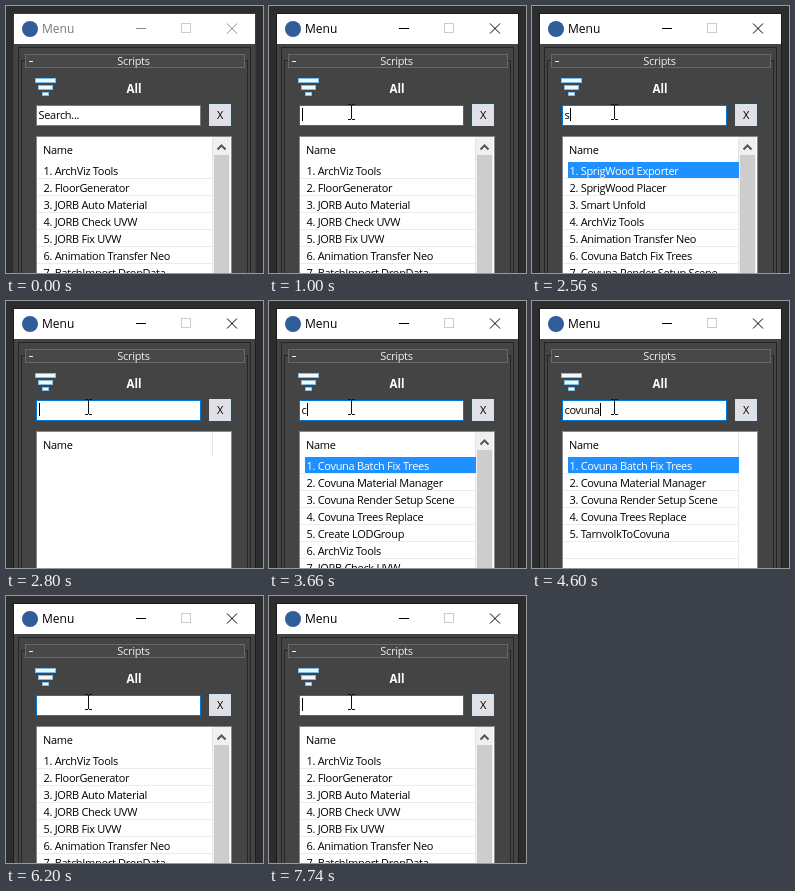
These frames come from a looping animation (257 px wide and 267 px high, 8000 ms). An HTML page:

```html
<!DOCTYPE html>
<html lang="en">
<head>
<meta charset="utf-8">
<title>Menu</title>
<style>
html, body { margin: 0; width: 100%; height: 100%; overflow: hidden; background: #2d2d2d; }
svg { display: block; shape-rendering: crispEdges; }
text { font: 11px "Open Sans", "Noto Sans", sans-serif; letter-spacing: -.3px; white-space: pre; }
</style>
</head>
<body>
<svg width="257" height="267" viewBox="0 0 257 267">
  <rect width="257" height="267" fill="#2d2d2d"/>
  <rect id="edge" x="7" y="7" width="243" height="270"/>
  <rect x="8" y="8" width="241" height="270" fill="#444"/>

  <!-- title bar -->
  <rect x="8" y="8" width="241" height="30" fill="#fff"/>
  <circle cx="24" cy="23" r="8" fill="#315d98" shape-rendering="auto"/>
  <text id="title" x="36" y="27" style="font-size:12px;letter-spacing:0">Menu</text>
  <path id="buttons" d="M130 22.5h10M221 17.5l10 10m0-10l-10 10" fill="none" shape-rendering="auto"/>
  <rect x="175.5" y="17.5" width="9" height="9" fill="none" stroke="#ccc"/>

  <!-- rollout -->
  <g fill="none" stroke="#252525">
    <rect x="12.5" y="41.5" width="232" height="250"/>
    <rect x="15.5" y="54.5" width="226" height="250"/>
  </g>
  <rect x="19.5" y="48.5" width="219" height="13" fill="#484848" stroke="#686868"/>
  <path d="M23 55.5h4" stroke="#eee"/>
  <text x="127.5" y="59" fill="#eee" text-anchor="middle">Scripts</text>
  <text x="128" y="87" fill="#fff" text-anchor="middle" style="font-weight:700;font-size:11.5px;letter-spacing:0">All</text>
  <g fill="#edf8ff" stroke="#78bdec">
    <rect x="29.5" y="72.5" width="20" height="4"/>
    <rect x="32.5" y="79.5" width="14" height="4"/>
    <rect x="36.5" y="86.5" width="6" height="3"/>
  </g>

  <!-- search field -->
  <rect id="field" x="30.5" y="99.5" width="164" height="20" fill="#fff"/>
  <text id="query" x="32.5" y="113"></text>
  <rect id="caret" y="102" width="1" height="13"/>
  <path id="beam" d="M79 98.5h3m1 0h3M82.5 99v14M79 113.5h3m1 0h3" stroke="#111" fill="none"/>
  <rect x="203.5" y="98.5" width="21" height="21" fill="#e0e0e6" stroke="#cfe3f3"/>
  <text x="214" y="113" text-anchor="middle">X</text>

  <!-- list -->
  <rect x="30.5" y="130.5" width="195" height="150" fill="#fff" stroke="#828790"/>
  <text x="37" y="148">Name</text>
  <path d="M206.5 132v23" stroke="#e3e3e3"/>
  <g id="rows"></g>
  <g id="scroll">
    <rect x="207" y="131" width="17" height="140" fill="#f0f0f0"/>
    <rect x="208" y="149" width="15" height="130" fill="#cdcdcd"/>
    <path d="M211.5 143.5l4-4 4 4" fill="none" stroke="#555" stroke-width="2" shape-rendering="auto"/>
  </g>
</svg>
<script>
const $ = id => document.getElementById(id);
const covuna = ["Covuna Batch Fix Trees", "Covuna Material Manager", "Covuna Render Setup Scene",
  "Covuna Trees Replace"];
const cov = [...covuna, "TarnvolkToCovuna"];
const co = [...cov, "Depolith Configurator", "VertexColor Manager"];
const c = [...covuna, "Create LODGroup", "ArchViz Tools", "JORB Check UVW"];
const sp = ["SprigWood Exporter", "SprigWood Placer"];
const s = [...sp, "Smart Unfold", "ArchViz Tools", "Animation Transfer Neo", covuna[0], covuna[2]];
const all = ["ArchViz Tools", "FloorGenerator", "JORB Auto Material", "JORB Check UVW", "JORB Fix UVW",
  "Animation Transfer Neo", "BatchImport DropData"];
const none = [];

// start time, query, list, scrollbar shown, caret shown
const steps = [
  [0, "Search...", all, 1, 0],
  [20, "", all, 1, 1], [580, "", all, 1, 0], [1000, "", all, 1, 1],
  [1720, "s", none, 0, 1], [1740, "s", s, 0, 1], [1760, "s", s, 1, 1],
  [1920, "sp", none, 0, 1], [1940, "sp", sp, 0, 1],
  [2500, "s", none, 0, 1], [2520, "s", s, 0, 1], [2540, "s", s, 1, 1],
  [2780, "", s, 1, 1], [2800, "", none, 0, 1], [2820, "", all, 1, 1], [3240, "", all, 1, 0],
  [3660, "c", c, 1, 1], [3960, "co", co, 0, 1], [4260, "cov", cov, 0, 1],
  [4380, "covu", cov, 0, 1], [4580, "covun", cov, 0, 1], [4600, "covuna", cov, 0, 1],
  [5160, "covun", cov, 0, 1], [5740, "co", co, 0, 1],
  [5760, "", all, 1, 1], [6200, "", all, 1, 0], [6760, "", all, 1, 1],
  [7320, "", all, 1, 0], [7740, "", all, 1, 1]
];

function rowsMarkup(list, selected) {
  if (!list.length) return "";
  let out = '<path d="M206.5 155v120" stroke="#ececec"/>';
  for (let i = 0; i < 7; i++) {
    const y = 156 + 17 * i, on = selected && i === 0;
    out += `<path d="M31 ${y + 16.5}h175" stroke="#ececec"/>`;
    if (on) out += `<rect x="36" y="${y}" width="171" height="16" fill="#1e90ff"/>`;
    if (list[i]) out += `<text x="37.5" y="${y + 13}" fill="${on ? "#fff" : "#000"}">${i + 1}. ${list[i]}</text>`;
  }
  return out;
}

const show = (id, on) => $(id).setAttribute("visibility", on ? "visible" : "hidden");
let current;

function draw(now) {
  const t = now % 8000;
  const step = steps.findLast(e => e[0] <= t);
  if (step !== current) {
    current = step;
    const [start, query, list, scroll, caret] = step, active = start > 0;
    $("edge").setAttribute("fill", active ? "#1c1c1c" : "#3c3c3c");
    $("title").setAttribute("fill", active ? "#000" : "#777");
    $("buttons").setAttribute("stroke", active ? "#000" : "#888");
    $("field").setAttribute("stroke", active ? "#0078d7" : "#7a7a7a");
    $("query").textContent = query;
    const x = 32.6 + (query ? $("query").getComputedTextLength() : 0);
    $("caret").setAttribute("x", Math.round(x));
    $("rows").innerHTML = rowsMarkup(list, active && list !== all);
    show("caret", caret);
    show("scroll", scroll);
    show("beam", active);
  }
  requestAnimationFrame(() => draw(performance.now() - origin));
}
const origin = performance.now();
draw(0);
</script>
</body>
</html>
```
